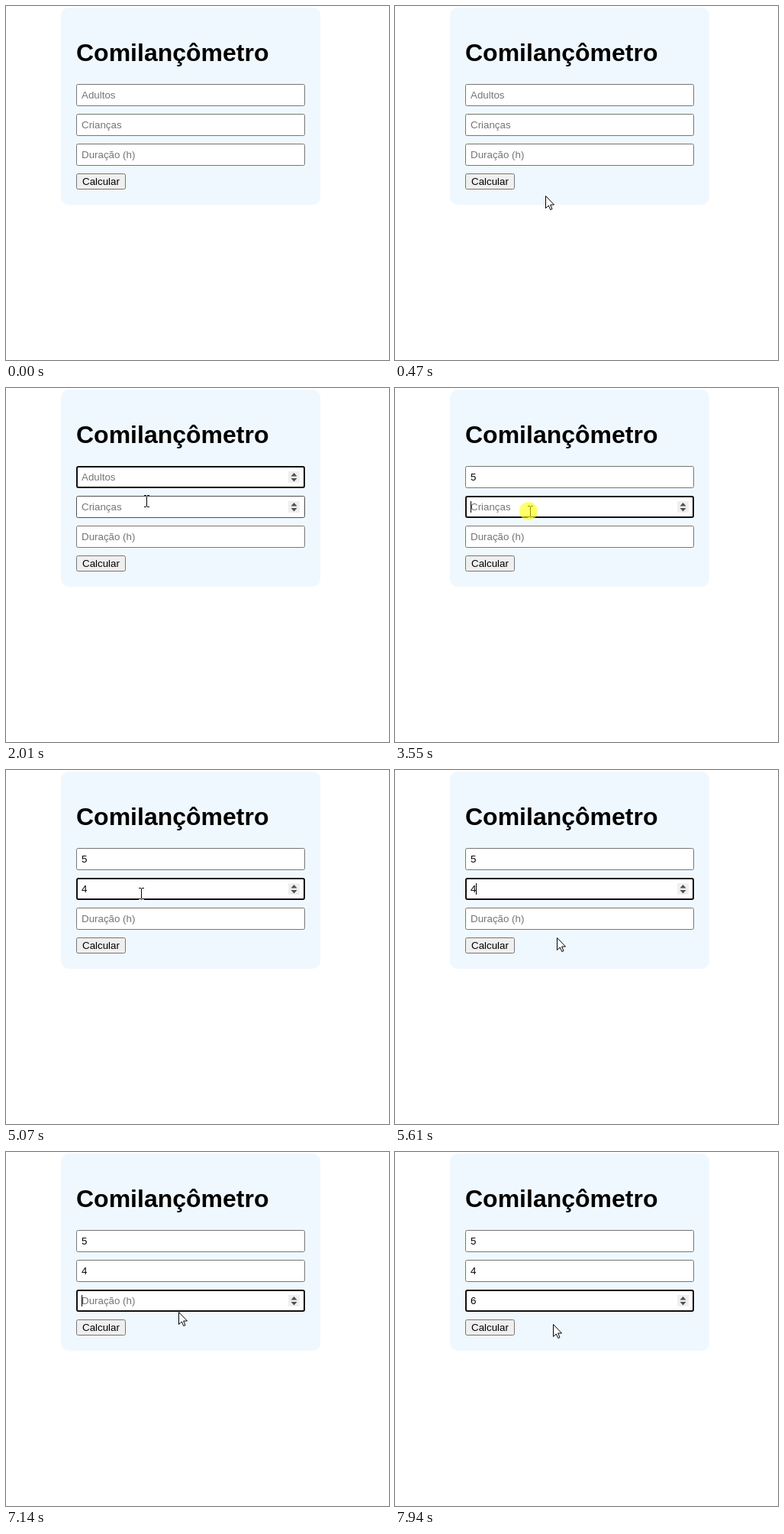
These frames come from a looping animation (502 by 463 pixels, 8 s). An HTML page:

```html
<!DOCTYPE html>
<html lang="pt">
<head>
<meta charset="utf-8">
<title>Comilançômetro</title>
<style>
  html, body { margin: 0; width: 100%; height: 100%; overflow: hidden; background: #fff; }
  svg { display: block; font: 13.3333px "Liberation Sans", Arial, sans-serif; }
  h1, .title { font-size: 32px; font-weight: bold; }
  .box { fill: #fff; stroke: #767676; }
  .hover .box { stroke: #4f4f4f; }
  .focus .box { stroke: #101010; stroke-width: 2; }
  .spin { visibility: hidden; }
  .hover .spin, .focus .spin { visibility: visible; }
  #beam { fill: #fff; mix-blend-mode: difference; }
</style>
</head>
<body>
<svg width="502" height="463" viewBox="0 0 502 463">
  <rect width="502" height="463" fill="#fff"/>
  <rect x="72" y="2" width="340" height="258" rx="10" fill="aliceblue"/>
  <text class="title" x="92" y="72">Comilançômetro</text>
  <g id="fields"></g>
  <rect x="92.5" y="219.5" width="64" height="20" rx="2" fill="#efefef" stroke="#767676"/>
  <text x="100" y="234">Calcular</text>
  <rect id="caret" width="1" height="15"/>
  <path id="beam" d="M-3-8h3v1h1v-1h3v1h-3v14h3v1h-3v-1h-1v1h-3v-1h3v-14h-3z"/>
  <path id="arrow" d="M.5.5V16.5L4.3 13L6.8 18.5L9 17.5L6.6 12H11.5Z" fill="#fff" stroke="#000"/>
  <circle id="click" r="12" fill="#ff0" fill-opacity=".58"/>
</svg>
<script>
const LOOP = 8000, BLINK = 525, TICK = 68;
const fields = [
  { label: 'Adultos', value: '5', focusAt: 1480, typeAt: 2410, clickMs: 70 },
  { label: 'Crianças', value: '4', focusAt: 3550, typeAt: 4540, clickMs: 70 },
  { label: 'Duração (h)', value: '6', focusAt: 6090, typeAt: 7270, clickMs: 60 }
];
// pointer path: time, x, y
const path = [
  [190, 230, 343], [500, 192, 235], [810, 175, 148], [950, 169, 116],
  [1610, 169, 116], [1750, 184, 148],
  [3080, 184, 148], [3210, 176, 166], [3280, 177, 162],
  [5130, 177, 162], [5480, 208, 216], [5540, 210, 225], [5820, 220, 199],
  [6349, 220, 199], [6350, 226, 209],
  [7800, 226, 209], [7940, 207, 225]
];
const $ = id => document.getElementById(id);
const show = (el, on) => el.setAttribute('visibility', on ? 'visible' : 'hidden');
const place = (el, x, y) => el.setAttribute('transform', `translate(${x} ${y})`);

fields.forEach((f, i) => {
  f.y = 102 + 39 * i;
  f.el = document.createElementNS('http://www.w3.org/2000/svg', 'g');
  f.el.innerHTML = `<rect class="box"/><text x="99" y="${f.y + 19}"></text>
    <g class="spin" transform="translate(370 ${f.y + 7})">
      <rect width="15" height="15" fill="#efefef"/>
      <path d="M3.5 6.5h8l-4-4.5zM3.5 9h8l-4 4.5z" fill="#505050"/>
    </g>`;
  f.box = f.el.querySelector('.box');
  f.text = f.el.querySelector('text');
  $('fields').append(f.el);
});

function pointer(t) {
  const i = path.findLastIndex(p => p[0] <= t);
  if (i < 0) return null;
  const [t0, x0, y0] = path[i], [t1, x1, y1] = path[i + 1] || [LOOP, x0, y0];
  const k = Math.floor((t - t0) / TICK) * TICK / (t1 - t0);
  return { x: Math.round(x0 + (x1 - x0) * k), y: Math.round(y0 + (y1 - y0) * k) };
}

function draw(t) {
  const p = pointer(t);
  const active = fields.findLast(f => t >= f.focusAt);
  const hovered = p && fields.find(f => p.y >= f.y && p.y < f.y + 29);

  for (const f of fields) {
    const typed = t >= f.typeAt, focus = f === active, inset = focus ? 1 : 0.5;
    f.el.setAttribute('class', (focus ? 'focus ' : '') + (f === hovered ? 'hover' : ''));
    const size = { x: 92 + inset, y: f.y + inset, width: 300 - 2 * inset, height: 29 - 2 * inset, rx: 2 };
    for (const k in size) f.box.setAttribute(k, size[k]);
    f.text.textContent = typed ? f.value : f.label;
    f.text.setAttribute('fill', typed ? '#000' : '#757575');
  }

  let caretOn = false;
  if (active) {
    const typed = t >= active.typeAt;
    const since = t - (typed ? active.typeAt : active.focusAt);
    caretOn = Math.floor(since / BLINK) % 2 === 0;
    place($('caret'), typed ? 106 : 99, active.y + 7);
  }
  show($('caret'), caretOn);

  show($('beam'), hovered);
  show($('arrow'), p && !hovered);
  show($('click'), active && t < active.focusAt + active.clickMs);
  if (p) {
    place($('beam'), p.x, p.y);
    place($('arrow'), p.x, p.y);
    place($('click'), p.x - 2, p.y - 1);
  }
}

const start = performance.now();
function frame() {
  draw((performance.now() - start) % LOOP);
  requestAnimationFrame(frame);
}
frame();
</script>
</body>
</html>
```
